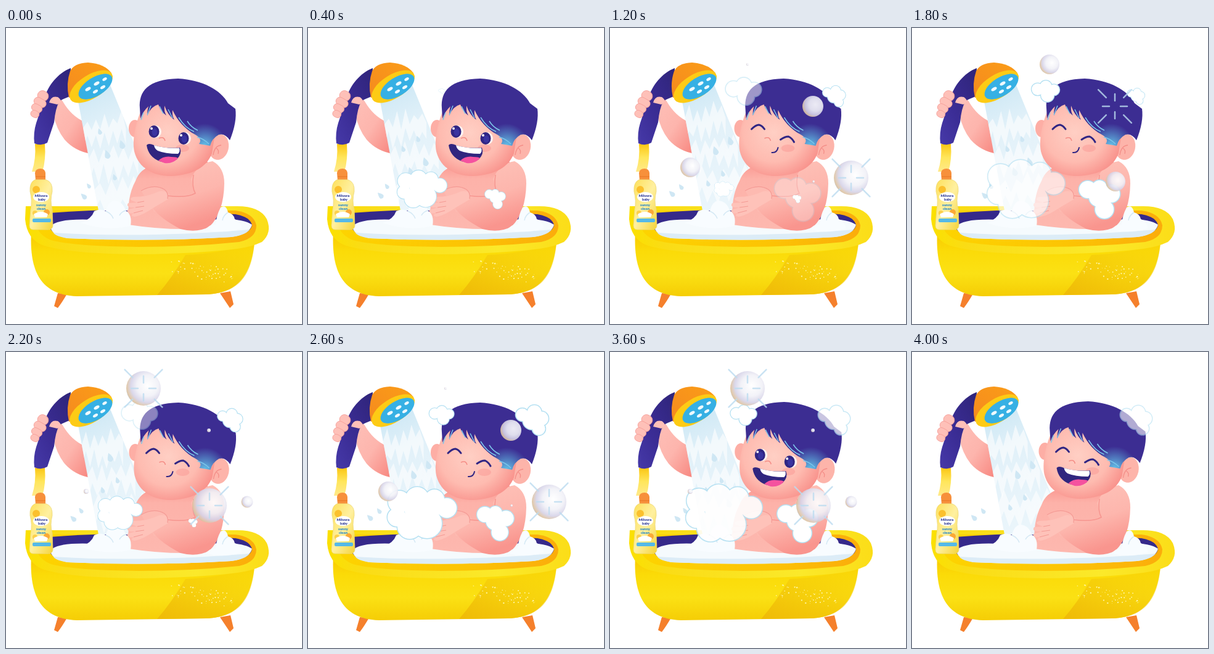
These frames come from a looping animation (480x480 px, 4.2 s). An HTML page:

```html
<!DOCTYPE html>
<html lang="en">
<head>
<meta charset="utf-8">
<title>Bath time</title>
<style>
html, body { margin: 0; width: 100%; height: 100%; overflow: hidden; background: #fff; }
svg { display: block; width: 100vw; height: 100vh; }
text { font-family: Lato, "Open Sans", sans-serif; font-weight: 900; text-anchor: middle; fill: #38449a; }
</style>
</head>
<body>
<svg viewBox="0 0 480 480">
<defs>
  <linearGradient id="tub" x1="0" y1="0" x2="0" y2="1">
    <stop offset="0" stop-color="#f9c800"/><stop offset=".3" stop-color="#fbdb08"/><stop offset=".65" stop-color="#fbe114"/><stop offset="1" stop-color="#f5cd05"/>
  </linearGradient>
  <linearGradient id="shade" x1="0" y1="1" x2="1" y2="0">
    <stop offset="0" stop-color="#efba08"/><stop offset="1" stop-color="#f8d60a" stop-opacity=".3"/>
  </linearGradient>
  <linearGradient id="rim" x1="0" y1="0" x2="1" y2="0">
    <stop offset="0" stop-color="#fbe000"/><stop offset=".15" stop-color="#fadc16"/><stop offset=".7" stop-color="#fbe92a"/><stop offset="1" stop-color="#fbdd18"/>
  </linearGradient>
  <linearGradient id="band" x1="0" y1="0" x2="1" y2="0">
    <stop offset="0" stop-color="#fdd400"/><stop offset=".6" stop-color="#fcc304"/><stop offset="1" stop-color="#fbac0b"/>
  </linearGradient>
  <linearGradient id="handle" x1="1" y1="0" x2="0" y2="1">
    <stop offset="0" stop-color="#2f2479"/><stop offset=".6" stop-color="#3b2d96"/><stop offset="1" stop-color="#4639a8"/>
  </linearGradient>
  <linearGradient id="knob" x1="0" y1="1" x2="1" y2="0">
    <stop offset="0" stop-color="#f58a1f"/><stop offset="1" stop-color="#fb9d17"/>
  </linearGradient>
  <linearGradient id="hose" x1="0" y1="0" x2="0" y2="1">
    <stop offset="0" stop-color="#fbc714"/><stop offset=".5" stop-color="#ffe65c"/><stop offset="1" stop-color="#ffe98a"/>
  </linearGradient>
  <linearGradient id="farArm" x1="0" y1="0" x2="1" y2="1">
    <stop offset="0" stop-color="#fec0b8"/><stop offset=".5" stop-color="#fdb5ad"/><stop offset="1" stop-color="#f7837c"/>
  </linearGradient>
  <linearGradient id="stream" x1="0" y1="0" x2=".25" y2="1">
    <stop offset="0" stop-color="#c9e6f4"/><stop offset=".4" stop-color="#e2f1f9"/><stop offset="1" stop-color="#eaf5fb"/>
  </linearGradient>
  <linearGradient id="chest" x1="0" y1="0" x2="0" y2="1">
    <stop offset="0" stop-color="#f98e88"/><stop offset=".3" stop-color="#fdb2a9"/><stop offset="1" stop-color="#fdb8af"/>
  </linearGradient>
  <linearGradient id="limb" x1="0" y1="0" x2=".35" y2="1">
    <stop offset="0" stop-color="#fec5bb"/><stop offset=".6" stop-color="#fdb6ad"/><stop offset="1" stop-color="#f9958e"/>
  </linearGradient>
  <radialGradient id="skin" cx=".42" cy=".45" r=".62">
    <stop offset="0" stop-color="#ffcfc4"/><stop offset=".6" stop-color="#febbb0"/><stop offset="1" stop-color="#f88f89"/>
  </radialGradient>
  <radialGradient id="hair" gradientUnits="userSpaceOnUse" cx="322" cy="191" r="36">
    <stop offset="0" stop-color="#62c4ea"/><stop offset=".3" stop-color="#5794cd"/><stop offset="1" stop-color="#3c2d92"/>
  </radialGradient>
  <radialGradient id="ball" cx=".62" cy=".42" r=".68">
    <stop offset="0" stop-color="#fff"/><stop offset=".45" stop-color="#f1f1f7"/><stop offset=".72" stop-color="#d6d3e8"/><stop offset=".9" stop-color="#dfc39f"/><stop offset="1" stop-color="#9fb4d8"/>
  </radialGradient>
  <linearGradient id="juice" x1="0" y1="0" x2="1" y2="1">
    <stop offset="0" stop-color="#fde05a"/><stop offset=".5" stop-color="#fff0a0"/><stop offset="1" stop-color="#f5d43a"/>
  </linearGradient>
  <clipPath id="jet"><path d="M117 119L168 90L232 246L207 296L150 296Z"/></clipPath>
</defs>

<!-- shower arm -->
<path d="M47 188Q49 212 42 233H59Q65 214 63 188Z" fill="url(#hose)"/>
<path d="M74 114Q86 108 92 119Q106 143 127 152L138 204Q112 200 95 181Q82 165 76 138Z" fill="url(#farArm)"/>
<path d="M105 65C84 73 68 94 63 112L49 154Q44 170 46 187Q57 192 67 186L78 153Q80 130 87 118Q93 115 103 111Z" fill="url(#handle)"/>
<g fill="#fec0b8" stroke="#f59e98" stroke-width=".8">
  <rect x="51" y="102" width="18" height="16" rx="8" transform="rotate(28 60 110)"/>
  <rect x="45" y="114" width="21" height="13" rx="6.5" transform="rotate(30 55 120)"/>
  <rect x="41" y="124" width="18" height="12" rx="6" transform="rotate(28 50 130)"/>
  <rect x="40" y="134" width="14" height="11" rx="5.5" transform="rotate(25 47 139)"/>
  <path d="M70 121Q73 109 84 112Q94 119 83 124Z" stroke="none"/>
</g>

<!-- tub -->
<path d="M84 430L99 431Q91 445 84 454L78 451ZM347 430L364 427L369 448L363 454Z" fill="#f5802c"/>
<path d="M41 330C38 385 50 433 115 435L325 432C380 430 401 395 404 335Z" fill="url(#tub)"/>
<path d="M245 433Q268 407 291 368Q350 366 403 348C399 398 380 430 325 432Z" fill="url(#shade)"/>
<path d="M32 289H375Q412 289 423 310Q432 332 415 347Q398 355 375 358Q310 366 215 367Q100 366 59 352Q34 342 31 310Z" fill="url(#rim)"/>
<path d="M44 296H372Q402 300 406 320Q406 341 378 347Q300 355 215 355Q110 354 73 344Q45 334 44 296Z" fill="url(#band)"/>
<path d="M70 300Q150 294 220 295L372 302Q396 306 399 320Q395 335 365 338Q230 346 100 340Q73 335 70 321Z" fill="#35298a"/>
<path d="M72 322Q82 308 145 311Q250 305 330 311Q382 307 399 319Q395 335 365 339Q230 347 100 341Q73 336 72 322Z" fill="#f5fafd"/>
<path d="M77 332Q220 341 395 327Q388 336 365 339Q230 347 100 341Q80 338 77 332Z" fill="#dcecf7"/>
<g id="specks" fill="#fff6a8"></g>

<g id="water"></g>

<!-- shower head -->
<path d="M102 113Q97 90 104 70Q110 57 133 56Q160 58 171 73L160 92Z" fill="url(#knob)"/>
<ellipse cx="138" cy="95" rx="39.500" ry="19" transform="rotate(-32 138 95)" fill="#fdcb15"/>
<ellipse cx="145" cy="95" rx="31" ry="15" transform="rotate(-32 145 95)" fill="#36b0e4"/>
<g fill="#eefaff">
  <ellipse cx="133" cy="99" rx="5" ry="2.500" transform="rotate(-30 133 99)"/>
  <ellipse cx="147" cy="90" rx="5" ry="2.500" transform="rotate(-30 147 90)"/>
  <ellipse cx="160" cy="83" rx="4" ry="2.200" transform="rotate(-30 160 83)"/>
  <ellipse cx="145" cy="103" rx="4.500" ry="2.300" transform="rotate(-30 145 103)"/>
  <ellipse cx="157" cy="96" rx="4.500" ry="2.300" transform="rotate(-30 157 96)"/>
</g>

<!-- boy -->
<path d="M240 222Q217 228 210 248Q195 275 199 319Q250 327 300 326L342 230L318 210Z" fill="url(#chest)"/>
<path d="M219 264Q240 252 257 262Q275 276 282 308L240 298Z" fill="#fdbab1"/>
<path d="M300 245Q310 220 335 216Q354 226 354 252Q353 300 330 322Q310 333 283 326Q250 309 237 291Q243 278 262 272Q292 277 306 268Z" fill="url(#limb)"/>
<path d="M304 238Q301 258 307 268Q293 276 262 272" fill="none" stroke="#f79690" stroke-width="1.500"/>
<path d="M240 291Q223 303 209 306Q200 305 207 300Q194 302 197 295L210 291Q193 292 198 284L213 283Q195 278 206 274Q230 274 248 265Q266 262 262 278Z" fill="#fec2b9"/>
<path d="M207 300L222 296M210 291L224 289M213 283L224 281M219 264Q240 252 257 262Q264 267 262 277" fill="none" stroke="#f49b95" stroke-width="1.200"/>

<g id="head">
  <ellipse cx="209" cy="163" rx="10" ry="14" fill="#fdaea5"/>
  <ellipse cx="345" cy="193" rx="16" ry="21" fill="#fdb4aa" transform="rotate(12 345 193)"/>
  <path d="M336 206Q338 191 349 190M341 195Q346 198 344 204" fill="none" stroke="#f48e88" stroke-width="1.300"/>
  <path d="M222 128C211 149 204 180 208 200C215 229 242 241 270 240C302 238 326 226 334 203L340 165L295 112Z" fill="url(#skin)"/>
  <path d="M217 130C215 103 230 83 279 82C319 84 349 101 360 122L372 131Q375 152 363 182Q355 170 345 173Q334 179 331 191L313 188Q319 180 307 173C290 164 278 150 270 133Q269 142 273 149Q262 141 257 126Q256 135 260 142Q250 134 247 124Q235 127 229 142Q229 133 231 127Q222 135 218 147Z" fill="url(#hair)"/>
  <path d="M223 137L219 149M235 126L229 141M249 127L255 139M263 132L270 146M280 145Q290 162 305 168M294 151Q300 161 311 166M310 177Q320 179 329 188" fill="none" stroke="#7cc6ea" stroke-width="1.500"/>
  <path d="M248 179Q256 175 258 183" fill="none" stroke="#f58e87" stroke-width="1.500"/>
  <ellipse cx="286" cy="195" rx="11" ry="6" fill="#f98f8b" opacity=".4"/>
  <g id="face"></g>
</g>

<!-- suds in the tub -->
<g fill="#f8fcff">
  <path d="M122 316Q139 309 143 297Q153 292 162 297Q166 280 177 280Q190 282 194 296Q205 302 202 321Q160 330 122 316Z"/>
  <path d="M324 326Q332 317 340 319Q341 304 348 291Q357 285 360 299Q370 302 371 310Q382 313 382 325Q350 335 324 326Z"/>
</g>
<path d="M162 297Q171 301 174 309M194 296Q187 298 184 304M360 299Q352 304 351 312" fill="none" stroke="#d5e9f5" stroke-width="1.500"/>

<!-- bottle -->
<g>
  <path d="M48 247L47 235Q48 228 56 228Q63 228 64 235V247Z" fill="#f7903b"/>
  <path d="M48 241H64" stroke="#e87726"/>
  <path d="M47 246H65Q76 250 75 265Q71 280 75 294L76 321Q75 327 68 327H44Q38 327 38 320L40 294Q43 280 39 265Q38 250 47 246Z" fill="url(#juice)" stroke="#ecd97c" stroke-width=".8"/>
  <circle cx="49" cy="262" r="6" fill="#fbc02d"/><circle cx="66" cy="299" r="5" fill="#fba936"/><circle cx="47" cy="300" r="4" fill="#fcd04b"/>
  <ellipse cx="57" cy="274" rx="13" ry="8" fill="#fff"/>
  <text x="57" y="274" font-size="6">Milvora</text>
  <text x="58" y="280" font-size="5.500">baby</text>
  <text x="57" y="289" font-size="6" style="fill:#2d8cc8">sunny</text>
  <text x="57" y="295" font-size="6" style="fill:#2d8cc8">clean</text>
  <path d="M45 302Q57 294 68 302L66 307H47Z" fill="#fff"/>
  <rect x="43" y="309" width="30" height="6" rx="2" fill="#54b9e8"/>
</g>

<g id="foam"></g>
<g id="bubbles"></g>
</svg>

<script>
const STEP = 200, STEPS = 21, CYCLE = 7, FOAM_CYCLE = 14 / 3, END = 20;
const el = id => document.getElementById(id);
const times = (n, fn) => Array.from({ length: n }, (_, i) => fn(i)).join('');

const seeded = seed => () => {
  seed = (seed * 16807) % 2147483647;
  return seed / 2147483647;
};

// keys: [step, ...values], linear between neighbours
function at(keys, n) {
  let i = 0;
  while (i < keys.length - 2 && keys[i + 1][0] <= n) i++;
  const a = keys[i], b = keys[i + 1];
  const k = Math.min(1, Math.max(0, (n - a[0]) / (b[0] - a[0])));
  return a.slice(1).map((v, j) => v + (b[j + 1] - v) * k);
}

function puff(balls, x, y, scale, opacity) {
  const draw = attr => balls.map(([cx, cy, r]) => `<circle cx="${cx}" cy="${cy}" r="${r}" ${attr}/>`).join('');
  return opacity < .02 ? '' : `<g transform="translate(${x} ${y}) scale(${scale})" opacity="${opacity}">` +
    draw('fill="#fff" stroke="#b4e0f2" stroke-width="3"') + draw('fill="#fff"') + '</g>';
}

// a suds cluster pops up, swells and fades: age, scale, opacity
const sudsLife = [[0, .2, 1], [.6, .22, 1], [.8, .6, 1], [1.4, .74, 1], [2.3, .87, 1], [2.8, 1, 1],
  [3.1, 1, 1], [3.3, 1.1, .9], [3.65, 1.12, .6], [4.75, 1.12, .3], [5, 1.12, 0]];
const suds = [
  { x: 185, y: 261, start: .7, balls: [[-37,-18,18],[-8,-23,19],[20,-22,16],[40,-8,16],[-41,7,15],[-20,22,20],[8,17,24],[0,-2,28]] },
  { x: 303, y: 277, start: 1.25, balls: [[-18,-15,14],[1,-18,12],[20,-8,14],[9,17,15],[0,-3,16]] },
  { x: 217, y: 102, start: 2, balls: [[-15,-3,11],[0,-8,11],[15,-2,10],[3,8,12]] }
];

const sudsAt = ({ x, y, start, balls }, n) => n >= END ? '' : times(4, i => {
  const age = n - start - i * FOAM_CYCLE;
  return age < -.01 || age > 5 ? '' : puff(balls, x, y, ...at(sudsLife, age));
});

// suds on the crown: two slower lives
const crownBalls = [[-15,-9,10],[4,-13,11],[15,-3,11],[11,13,10],[0,0,14]];
const crownKeys = [[2, .1, 0], [4, .45, 1], [6, .72, 1], [7, .8, .5], [8, .45, 1], [9, .55, 1], [13, 1.03, 1], [16, 1, .85], [20, 1, .6]];

const bubbles = [
  { x: 391, y: 243, start: 3, radii: [3, 9.5, 20, 28] },
  { x: 329, y: 127, start: 4, radii: [3, 10, 17, 23, 28] },
  { x: 130, y: 226, start: 4, radii: [4, 10, 16, 21] },
  { x: 223, y: 59, start: 6, radii: [2, 6, 11, 16, 21, 28] },
  { x: 330, y: 249, start: 6, radii: [2, 6, 11, 16, 21, 28] }
];

const rays = reach => `<g stroke="#bcdcf0" stroke-width="2.500" stroke-linecap="round" opacity=".8">` +
  times(8, i => {
    const [a, b] = i % 2 ? [reach - 18, reach] : [9, 20];
    return `<path d="M${a} 0H${b}" transform="rotate(${i * 45})"/>`;
  }) + '</g>';

function bubble({ x, y, start, radii }, n) {
  if (n < start || n >= END) return '';
  const age = (n - start) % CYCLE, last = radii.length - 1;
  if (age > last + 1) return '';
  const ball = age <= last ? `<circle r="${radii[age]}" fill="url(#ball)" opacity=".9"/>` : '';
  return `<g transform="translate(${x} ${y})">${ball}${age === last ? rays(43) : age > last ? rays(38) : ''}</g>`;
}

// white torn band across the jet
function torn(y, seed) {
  const rnd = seeded(seed), left = 118 + (y - 120) * .185, right = 168 + (y - 92) * .4;
  const edge = (base, amp) => Array.from({ length: 11 }, (_, i) => {
    const k = i / 10;
    return [left + (right - left) * k, base - k * 10 + (i % 2 ? -1 : 1) * amp * (.3 + rnd())];
  });
  const pts = [...edge(y, 13), ...edge(y + 32, 14).reverse()];
  return `<polygon points="${pts.map(p => p.map(v => v.toFixed(1))).join(' ')}" fill="#fff" opacity=".6"/>`;
}

const drop = (x, y, s, turn) => `<path d="M0 -7Q5 1 4 4Q0 9 -4 4Q-5 1 0 -7Z"
  transform="translate(${x} ${y}) rotate(${turn}) scale(${s})" fill="#cfe7f4"/>`;

function water(n) {
  const p = n % CYCLE, k = p / CYCLE;
  const bands = times(3, i => torn(158 + i * 50 - k * 20, 31 + i * 977 + p * 53));
  const inner = times(4, i => drop(152 + i * 12 + k * 8, 168 + (i * 37 + p * 14) % 90, .8 + i % 2 * .3, -18));
  return `<path d="M117 119L168 90L232 246L207 296L150 296Z" fill="url(#stream)"/>
    <g clip-path="url(#jet)">${bands}${inner}</g>` +
    drop(134 - k * 22, 256 + k * 2, .7 + k * .1, -35) + drop(126 - k * 30, 273 - k * 5, .9, -45);
}

const openEye = (x, y) => `<ellipse cx="${x + 3}" cy="${y}" rx="9" ry="10" fill="#fff" opacity=".8"/>
  <ellipse cx="${x}" cy="${y}" rx="8.500" ry="10" fill="#302684"/>
  <ellipse cx="${x + 1}" cy="${y + 1}" rx="4.500" ry="6" fill="#3a34a0"/>
  <circle cx="${x - 4}" cy="${y - 5}" r="2" fill="#fff"/>`;
const line = d => `<path d="${d}" fill="none" stroke="#302684" stroke-width="3" stroke-linecap="round" stroke-linejoin="round"/>`;
const shutEyes = line('M227 164Q234 157 239 157Q244 158 248 164') + line('M274 181Q281 176 287 176Q293 179 296 185');
const grin = `<path d="M228 190Q231 186 240 190Q258 196 282 194Q286 204 277 213Q264 221 249 216Q231 209 228 190Z" fill="#30267f"/>
  <path d="M240 190Q258 196 281 194.500Q283 200 279 204Q258 204 246 199Q241 196 240 190Z" fill="#fff"/>
  <path d="M247 215Q256 207 268 209Q277 209 279 211Q270 221 257 219Z" fill="#f5529f"/>`;
const smile = `<path d="M260 202Q268 203 270 194" fill="none" stroke="#302684" stroke-width="2" stroke-linecap="round"/>`;

const headKeys = [[0, 0, 0], [4, 0, 0], [6, 2.5, 0], [9, 1, 0], [13, 0, 0], [16, 0, 0], [20, 6.5, -2]];

function draw(n) {
  const shut = n >= 6 && n < 15 || n >= 19;
  const laugh = n < 6 || n >= 18;
  el('head').setAttribute('transform', `translate(${at(headKeys, n)})`);
  el('face').innerHTML = (shut ? shutEyes : openEye(240, 168) + openEye(288, 179)) + (laugh ? grin : smile);
  el('water').innerHTML = water(n);
  el('foam').innerHTML = suds.map(s => sudsAt(s, n)).join('') + puff(crownBalls, 363, 111, ...at(crownKeys, n));
  el('bubbles').innerHTML = bubbles.map(b => bubble(b, n)).join('');
}

const rnd = seeded(77);
el('specks').innerHTML = times(60, () => {
  const x = 268 + rnd() * 100, y = 376 + rnd() * 24 + (x - 268) * .15;
  return `<circle cx="${x}" cy="${y}" r="${.4 + rnd() * .8}"/>`;
});

let shown = -1;
function tick() {
  const n = Math.floor(performance.now() / STEP) % STEPS;
  if (n !== shown) draw(shown = n);
  requestAnimationFrame(tick);
}
tick();
</script>
</body>
</html>
```
